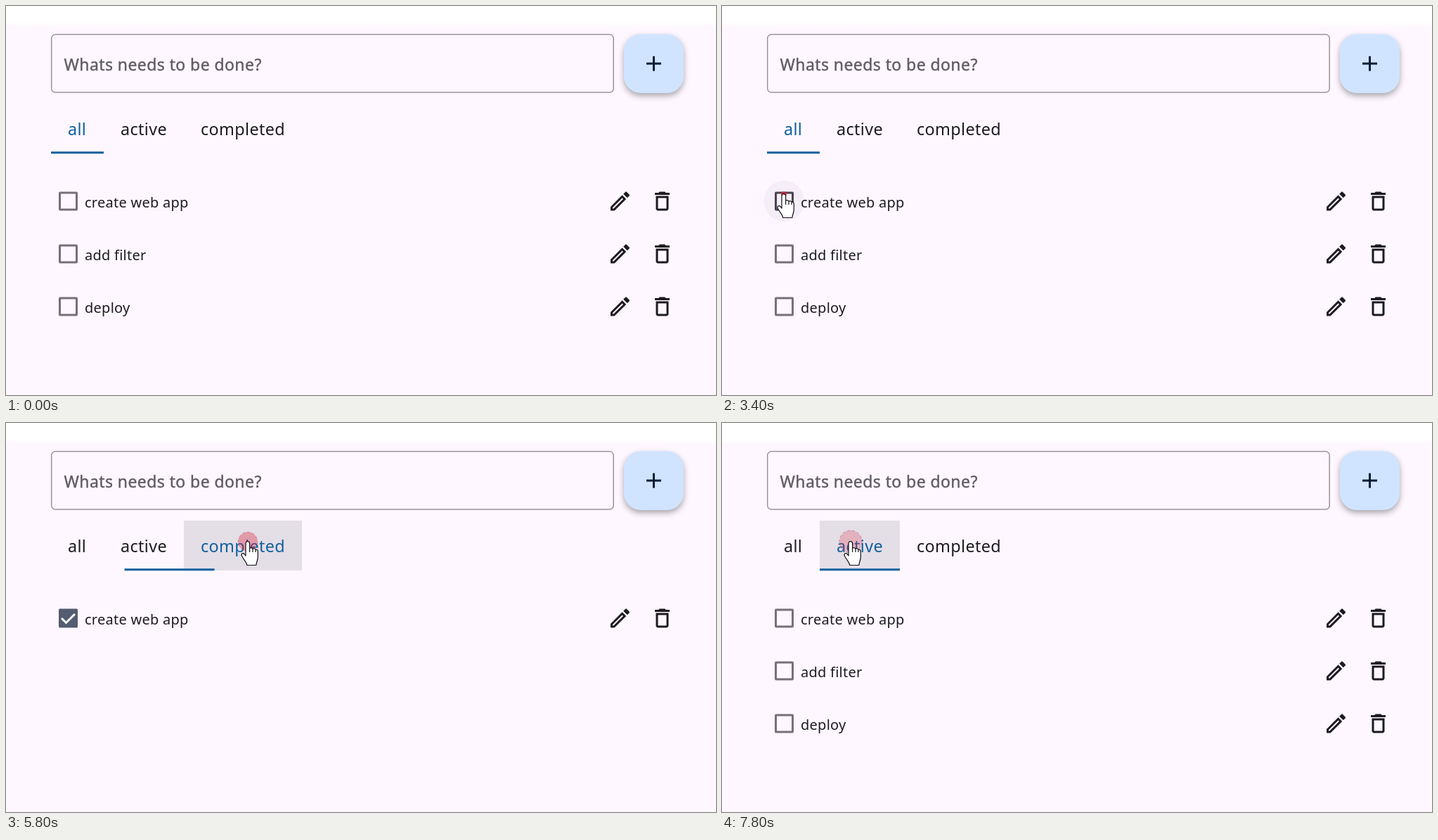
These frames come from a looping animation (1010 px wide and 554 px high, 8 s). An HTML page:

```html
<!DOCTYPE html>
<html lang="en">
<head>
<meta charset="utf-8">
<title>To-do list</title>
<style>
  html, body { margin: 0; width: 100%; height: 100%; overflow: hidden; background: #fef7ff; }
  svg { display: block; font-family: "Noto Sans", "Open Sans", sans-serif; fill: #1d1b20; }
  .label { font-size: 23px; letter-spacing: .42px; fill: #605b63; stroke: #605b63; stroke-width: .4px; }
  .tab { font-size: 23.4px; letter-spacing: .35px; }
  .item { font-size: 20px; letter-spacing: .25px; }
  .fab { fill: #d1e4ff; filter: drop-shadow(0 4px 4px #0005); }
  .line { fill: none; stroke-width: 3; }
  .cursor { fill: #fff; stroke: #111; stroke-width: 1.2; stroke-linejoin: round; }
</style>
</head>
<body>
<svg width="1010" height="554" viewBox="0 0 1010 554">
  <defs>
    <linearGradient id="top" x2="0" y2="1">
      <stop offset=".72" stop-color="#fff"/>
      <stop offset="1" stop-color="#fff" stop-opacity="0"/>
    </linearGradient>
    <g id="icons">
      <path transform="translate(855.5 260) scale(1.5)" d="M14.06 9.02l.92.92L5.92 19H5v-.92l9.06-9.06M17.66 3c-.25 0-.51.1-.7.29l-1.83 1.83 3.75 3.75 1.83-1.83c.39-.39.39-1.02 0-1.41l-2.34-2.34c-.2-.2-.45-.29-.71-.29zm-3.6 3.19L3 17.25V21h3.75L17.81 9.94l-3.75-3.75z"/>
      <path transform="translate(915.5 260) scale(1.5)" d="M16 9v10H8V9h8m-1.5-6h-5l-1 1H5v2h14V4h-3.5l-1-1zM18 7H6v12c0 1.1.9 2 2 2h8c1.1 0 2-.9 2-2V7z"/>
    </g>
    <path id="arrow" class="cursor" d="M0 0V24.5L5.5 19.5 9 27.5 12.5 26 9.2 18H17.5Z"/>
    <g id="hand" class="cursor">
      <path d="M-3 2.5a2.8 2.8 0 0 1 5.6 0V9q2.6-1 4.4 1 2.5-1 4 1 3.3-.3 3.3 3.5v7c0 5-2 7-2.5 12h-13c-.5-4-4-7-7.3-13-1.7-3.5 1.5-5 3.5-3l2 2.6Z"/>
      <path d="M2.6 9v6M7 10v5M11 11v4" fill="none"/>
    </g>
  </defs>
  <rect width="1010" height="31" fill="url(#top)"/>
  <rect x="64.7" y="40.6" width="799.5" height="82.5" rx="5.5" fill="none" stroke="#99949b" stroke-width="1.5"/>
  <text class="label" x="82.5" y="92">Whats needs to be done?</text>
  <rect class="fab" x="879" y="40" width="85" height="84" rx="24"/>
  <path class="line" d="M911 82h21M921.5 71.5v21" stroke="#001d36"/>
  <g id="app"></g>
</svg>
<script>
const LOOP = 8000, STEP = 200, PRIMARY = '#10609d';
const app = document.getElementById('app');

const tabs = [
  { name: 'all', x: 64, w: 75 },
  { name: 'active', x: 139, w: 114 },
  { name: 'completed', x: 253, w: 168 },
];
const items = ['create web app', 'add filter', 'deploy'];

// Pointer path: time, x, y
const path = [
  [1000, 52, 30], [1200, 58, 90], [1800, 34, 146], [2000, 41, 146], [2200, 56, 205],
  [2400, 84, 262], [3400, 88, 268], [3600, 88, 268], [4400, 221, 175], [4800, 221, 175],
  [5200, 344, 169], [5800, 344, 169], [6600, 81, 272], [6800, 81, 272],
  [7400, 183, 169], [8000, 183, 169],
];
const clicks = [3360, 4550, 5550, 6650, 7500];
const tabChanges = [[0, 0], [4700, 1], [5700, 2], [7500, 1]];

const mix = (a, b, k) => a + (b - a) * k;
const ease = k => k * k * (3 - 2 * k);

function pointerAt(t) {
  const i = path.findIndex(p => p[0] > t);
  if (i < 1) return null;
  const [a, b] = [path[i - 1], path[i]];
  const k = (t - a[0]) / (b[0] - a[0]);
  return { x: mix(a[1], b[1], k), y: mix(a[2], b[2], k) };
}

function tabBar(t, selected, pointer, pressed) {
  const now = tabChanges.findLastIndex(c => c[0] <= t);
  const from = tabs[tabChanges[Math.max(now - 1, 0)][1]], to = tabs[selected];
  const k = ease(Math.min(1, (t - tabChanges[now][0]) / 300));
  const buttons = tabs.map(({ name, x, w }, i) => {
    const over = pointer && pointer.x >= x && pointer.x < x + w && pointer.y > 139 && pointer.y < 210;
    const fill = pressed ? '#e4dee7' : '#f5eff8';
    return (over ? `<rect x="${x}" y="139" width="${w}" height="71" fill="${fill}"/>` : '') +
      `<text class="tab" x="${x + 24}" y="184" ${i === selected ? `fill="${PRIMARY}"` : ''}>${name}</text>`;
  }).join('');
  return buttons +
    `<rect x="${mix(from.x, to.x, k)}" y="207.3" width="${mix(from.w, to.w, k)}" height="3" fill="${PRIMARY}"/>`;
}

function row(name, index, done, pointer) {
  const over = pointer && Math.hypot(pointer.x - 88.5, pointer.y - 278 - index * 75) < 29;
  const box = done
    ? `<rect x="75" y="264.5" width="27" height="27" rx="1.5" fill="#535c70"/>
       <path class="line" d="M79 278l6.5 6.5L98 272" stroke="#fff"/>`
    : `<rect class="line" x="76.5" y="266" width="24" height="24" rx=".5" stroke="${over ? '#49434f' : '#767079'}"/>`;
  return `<g transform="translate(0 ${index * 75})">
    ${over ? '<circle cx="88.5" cy="278" r="29" fill="#f5edf8"/>' : ''}${box}
    <text class="item" x="112" y="287">${name}</text><use href="#icons"/></g>`;
}

function clickMark(age, { x, y }) {
  const k = age / 300;
  return `<circle cx="${x}" cy="${y}" r="${mix(2, 16, k)}" fill="#e0203c" fill-opacity="${mix(.95, .24, k)}"
    stroke="#a8505f" stroke-opacity="${.5 * k}" stroke-dasharray="4 3"/>`;
}

function draw(t) {
  const pointer = pointerAt(t);
  const age = t - (clicks.findLast(c => c <= t) ?? -LOOP);
  const pressed = age <= 300;
  const selected = tabChanges.findLast(c => c[0] <= t)[1];
  const firstDone = t >= 3600 && t < 6700;
  const shown = items
    .map((name, i) => ({ name, done: i === 0 && firstDone }))
    .filter(item => selected === 0 || item.done === (selected === 2));

  let html = tabBar(t, selected, pointer, pressed) +
    shown.map((item, i) => row(item.name, i, item.done, pointer)).join('');
  if (pointer) {
    const { x, y } = pointer;
    const onTab = x > 64 && x < 421 && y > 139 && y < 210;
    const onBox = shown.length && Math.hypot(x - 88.5, y - 278) < 29;
    if (pressed) html += clickMark(age, pointer);
    html += `<use href="#${onTab || onBox ? 'hand' : 'arrow'}" x="${x}" y="${y}"/>`;
  }
  app.innerHTML = html;
}

let last = -1;
function tick() {
  const t = Math.floor(performance.now() % LOOP / STEP) * STEP;
  if (t !== last) draw(last = t);
  requestAnimationFrame(tick);
}
tick();
</script>
</body>
</html>
```
